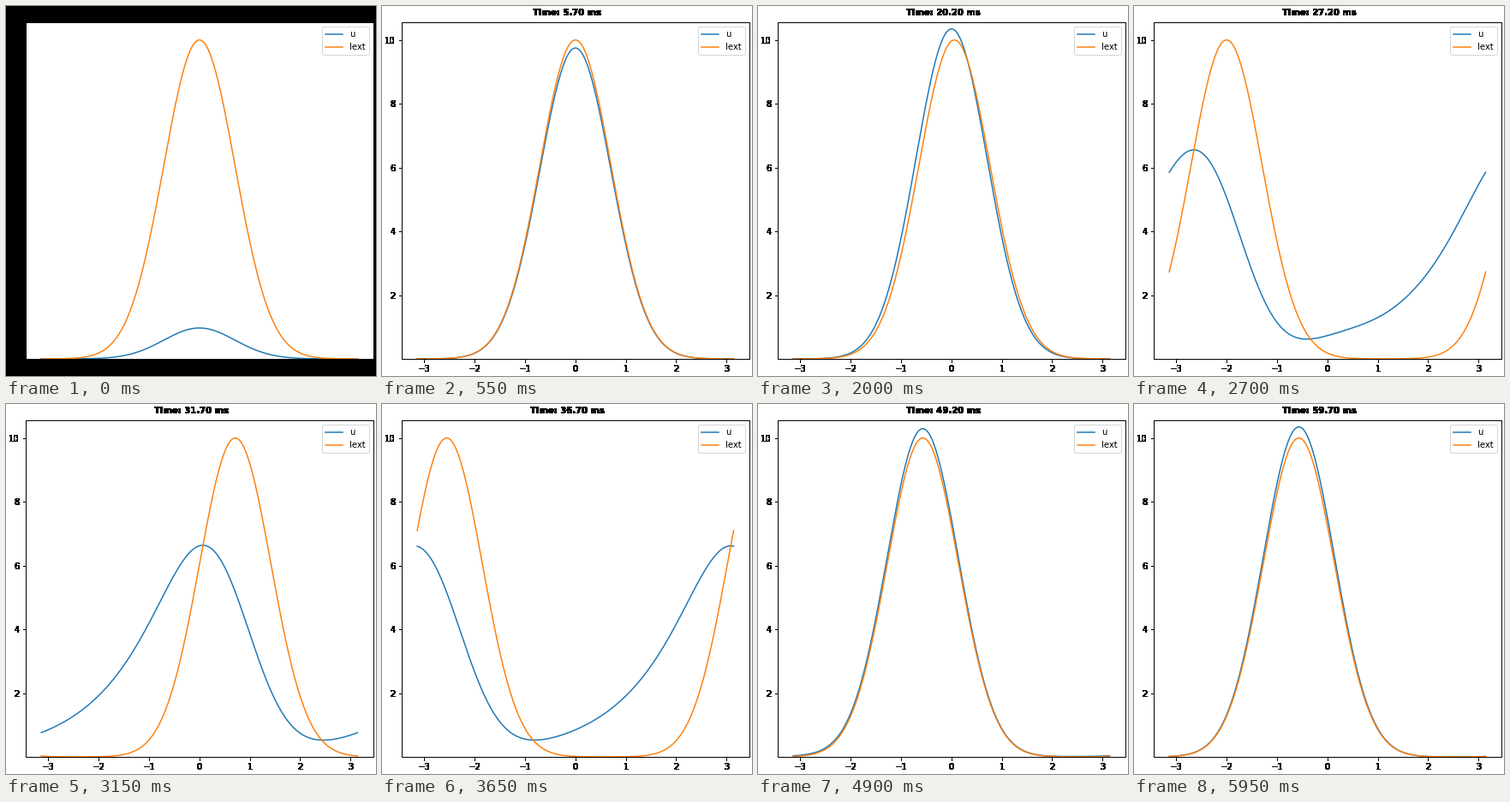
These frames come from a looping animation (432 px wide and 432 px high, 6 s). A matplotlib script:

```python
import numpy as np
import matplotlib.pyplot as plt
from matplotlib.animation import FuncAnimation

# Ring attractor network tracking a moving Gaussian stimulus
N, DT, TAU = 512, 0.1, 2.0
K, A, AMP, J0 = 8.1, 0.5, 10.0, 5.0
STEPS, STRIDE = 600, 5

x = np.linspace(-np.pi, np.pi, N)


def wrap(d):
    return (d + np.pi) % (2 * np.pi) - np.pi


def simulate():
    third = STEPS // 3
    pos = np.concatenate([np.zeros(third), np.linspace(0, 12, third), np.full(third, 12.0)])
    stim = AMP * np.exp(-0.25 * (wrap(x - pos[:, None]) / A) ** 2)
    conn = J0 * np.exp(-0.5 * (wrap(x[:, None] - x) / A) ** 2) / (np.sqrt(2 * np.pi) * A)
    decay = np.exp(-DT / TAU)
    u, trace = np.zeros(N), []
    for s in stim:
        sq = u ** 2
        drive = conn @ (sq / (1 + K * sq.sum())) + s
        u = drive + (u - drive) * decay
        trace.append(u)
    return np.array(trace), stim


def harden(img, dpi):
    """Turn every partly covered pixel solid black."""
    out = np.zeros_like(img)
    out[..., 3] = img[..., 3] > 0
    return out, 0, 0


u, stim = simulate()

fig, ax = plt.subplots(figsize=(6, 6), dpi=72, layout="constrained")
line_u, = ax.plot(x, u[1], label="u")
line_s, = ax.plot(x, stim[1], label="Iext")
ax.set_ylim(0.98 * min(u.min(), stim.min()), 1.02 * max(u.max(), stim.max()))
ax.legend(loc="best")
title = fig.suptitle("Time: 0.20 ms", fontsize=10, fontweight="bold")
for artist in (title, ax.xaxis, ax.yaxis, *ax.spines.values()):
    artist.set_agg_filter(harden)

fig.draw_without_rendering()
fig.set_layout_engine("none")


def update(i):
    t = 1 + i * STRIDE
    fig.set_facecolor("black" if i == 0 else "white")
    line_u.set_ydata(u[t])
    line_s.set_ydata(stim[t])
    title.set_text(f"Time: {(t + 1) * DT:.2f} ms")
    return line_u, line_s, title


anim = FuncAnimation(fig, update, frames=STEPS // STRIDE, interval=50,
                     repeat=True, repeat_delay=0, blit=False)
plt.show()
```
